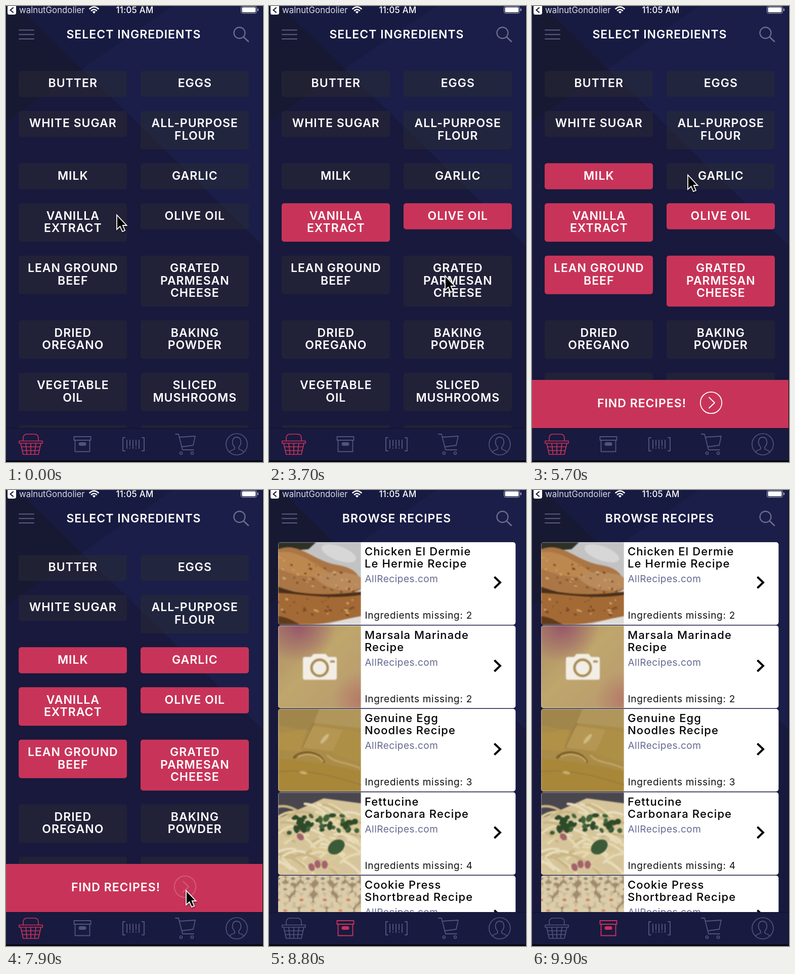
Recreate the animation shown at these times as an HTML page. Size 508 by 900 pixels, loop 10 s.

```html
<!DOCTYPE html>
<html lang="en">
<head>
<meta charset="utf-8">
<title>Recipe finder</title>
<style>
html, body { margin: 0; width: 100%; height: 100%; overflow: hidden; background: #18193c; }
svg { display: block; width: 100vw; height: 100vh; }
text { font-family: Inter, "Open Sans", sans-serif; }
.cap { font-size: 23px; font-weight: 600; letter-spacing: 1px; fill: #fff; text-anchor: middle; }
.name { font-size: 22px; font-weight: 500; letter-spacing: 1.1px; fill: #000; }
.site { font-size: 19px; letter-spacing: .5px; fill: #656990; }
.miss { font-size: 19px; letter-spacing: .7px; fill: #111; }
.line { fill: none; stroke-linejoin: round; stroke-linecap: round; }
</style>
</head>
<body>
<svg id="stage" viewBox="0 0 508 900" preserveAspectRatio="none"></svg>
<script>
const LOOP = 10000;
const RED = '#c83459', TILE = 'rgba(42,45,52,.5)';
const GREY_RGB = [80, 83, 124], RED_RGB = [200, 50, 88];
const stage = document.getElementById('stage');

const rect = (x, y, w, h, fill, extra = '') =>
  `<rect x="${x}" y="${y}" width="${w}" height="${h}" fill="${fill}" ${extra}/>`;
const line = (d, color, width = 2, extra = '') =>
  `<path class="line" d="${d}" stroke="${color}" stroke-width="${width}" ${extra}/>`;
const shape = (d, fill) => `<path d="${d}" fill="${fill}"/>`;
const ellipse = (x, y, rx, ry, fill, turn = 0) =>
  `<ellipse cx="${x}" cy="${y}" rx="${rx}" ry="${ry}" fill="${fill}" transform="rotate(${turn} ${x} ${y})"/>`;
const text = (cls, x, y, s, extra = '') => `<text class="${cls}" x="${x}" y="${y}" ${extra}>${s}</text>`;
const group = (id, body, extra = '') => `<g id="${id}" ${extra}>${body}</g>`;

function random(seed) {
  return () => (seed = (seed * 16807) % 2147483647) / 2147483647;
}

const backdrop = rect(0, 0, 508, 900, '#18193c') +
  shape('M0 0H23L150 124L0 228Z', '#171933') +
  shape('M23 0H330L150 124Z', '#181b41') +
  shape('M330 0H508V473L150 124Z', '#1a1e48') +
  rect(507, 0, 1, 900, '#0a0b1a');

const header = title => line('M26 47.5H55M26 56.3H55M26 65H55', '#5b5d80', 2) +
  `<circle class="line" cx="461.5" cy="53" r="11" stroke="#6b6d8c" stroke-width="2.3"/>` +
  line('M469.5 61L479 70', '#6b6d8c', 2.8) + text('cap', 252.5, 63.8, title);

// label lines, column, top, time of the tap
const TILES = [
  ['BUTTER', 0, 128], ['EGGS', 1, 128],
  ['WHITE SUGAR', 0, 207], ['ALL-PURPOSE|FLOUR', 1, 207],
  ['MILK', 0, 310.3, 5200], ['GARLIC', 1, 310.3, 5900],
  ['VANILLA|EXTRACT', 0, 389.3, 1000], ['OLIVE OIL', 1, 389.3, 2600],
  ['LEAN GROUND|BEEF', 0, 492.8, 4500], ['GRATED|PARMESAN|CHEESE', 1, 492.8, 3900],
  ['DRIED|OREGANO', 0, 620.3], ['BAKING|POWDER', 1, 620.3],
  ['VEGETABLE|OIL', 0, 723.8], ['SLICED|MUSHROOMS', 1, 723.8],
  ['', 0, 827], ['', 1, 827]
];

function tile([label, col, top], i) {
  const rows = label.split('|'), x = 25 + col * 241;
  return group('tile' + i,
    rect(x, top, 214, 27 + rows.length * 24.5, TILE, 'rx="5"') +
    rows.map((s, n) => text('cap', x + 107.3, top + 32.2 + n * 24.5, s)).join(''));
}

const banner = rect(0, 738, 507, 95, RED) + text('cap', 217, 791.8, 'FIND RECIPES!') +
  group('go', `<circle class="line" cx="354" cy="783" r="21.2" stroke="#fff" stroke-width="1.8"/>` +
    line('M350 772.5L361 783L350 793.5', '#fff', 1.8));

function chicken() {
  const r = random(7);
  let s = rect(0, 0, 164, 163, '#c4c3c4') + shape('M0 0H75L60 14L0 18Z', '#2f3026') +
    ellipse(120, 22, 36, 14, '#d8d7d7', 20) +
    shape('M0 14C40 -2 66 34 112 44C150 50 164 62 164 92C140 112 70 108 0 90Z', '#ab7645') +
    shape('M0 20C40 14 70 42 104 62C70 76 30 64 0 52Z', '#bd8850') +
    shape('M70 66C110 54 150 60 164 70V90C130 102 90 92 70 66Z', '#b98a5c') +
    shape('M0 98C50 96 110 108 164 104V146C120 154 90 164 40 163H0Z', '#a46a36') +
    shape('M0 88C50 108 110 104 164 98V104C100 114 50 102 0 100Z', '#4b3019') +
    shape('M0 146C20 148 34 158 44 163H0Z', '#5f3b1d') +
    shape('M100 163C124 152 150 150 164 146V163Z', '#dedcda');
  for (let i = 0; i < 70; i++) {
    const x = r() * 155, low = r() > .5;
    s += ellipse(x, low ? 108 + r() * 36 : 26 + x * .25 + r() * 45, 1 + r() * 3, 1 + r() * 1.5,
      r() > .4 ? '#7d4c25' : '#cfa36b', 25);
  }
  return s;
}

const blank = () => rect(0, 0, 164, 163, 'url(#tan)') + rect(0, 0, 164, 163, 'url(#rose)') +
  rect(0, 0, 164, 163, 'url(#rose2)') +
  shape('M52 62H65L70 56H94L99 62H112Q116 62 116 66V103Q116 107 112 107H53Q49 107 49 103V66Q49 62 53 62Z', '#f2eee6') +
  `<circle cx="82" cy="83.5" r="16" fill="#f2eee6" stroke="#a98d58" stroke-width="5"/>` +
  rect(103, 69, 9, 4, '#a98d58');

const noodles = () => rect(0, 0, 164, 163, '#a98c48') +
  shape('M0 0H86L68 45L0 32Z', '#a0864a') + shape('M82 0H164V38L70 28Z', '#b0965a') +
  shape('M70 33L130 42L108 84L48 76Z', '#b59753') + shape('M128 40L164 46V106L106 88Z', '#ae8f46') +
  shape('M0 48L56 40L44 84L0 80Z', '#b09147') +
  shape('M0 98C60 104 100 108 164 124V163H0Z', '#a88739') +
  line('M32 96C45 82 78 82 90 104', '#7c5e2a', 5) +
  line('M40 94C58 86 78 90 88 103M98 92C112 108 136 104 164 118', '#c0a15d', 4) +
  line('M0 124C50 118 110 132 164 150M70 28L48 76', '#95763a', 1.5) +
  ellipse(92, 59, 12, 4, '#cdb983', -50) + ellipse(50, 126, 8, 3, '#c6ad70', 10);

function pasta() {
  const r = random(21);
  let s = rect(0, 0, 164, 163, '#d6c59b') + shape('M0 0H164V22L90 12L0 52Z', '#4a464d');
  for (let i = 0; i < 65; i++) {
    const x = r() * 160, y = 34 + r() * 126, a = r() * 60 - 20;
    s += line(`M${x - 22} ${y - a * .5}Q${x} ${y - 12} ${x + 24} ${y + a * .5}`,
      ['#e6d8b0', '#dcc998', '#cab584', '#e8dcba'][i % 4], 5);
  }
  for (const [x, y] of [[38, 72], [44, 88], [78, 142], [66, 148], [92, 143]])
    s += ellipse(x, y, 8, 6, '#a3626a', x);
  for (let i = 0; i < 40; i++) {
    const x = 32 + r() * 124;
    s += ellipse(x, 44 + r() * 30 + Math.abs(x - 95) * .08, 4 + r() * 5, 3 + r() * 3,
      i % 3 ? '#2d4a29' : '#40633a', r() * 180);
  }
  return s + ellipse(115, 108, 18, 13, '#3a5a38', -35) + ellipse(22, 80, 5, 4, '#3d5a34');
}

function cookies() {
  let s = rect(0, 0, 164, 163, '#a08a70');
  for (let row = 0; row < 4; row++)
    for (let n = 0; n < 6; n++) {
      const size = 14 + row * 4, x = n * size * 2.1 + (row % 2) * 14, y = 6 + row * 21;
      s += ellipse(x, y, size, size * .62, '#cdbb97');
      for (let p = 0; p < 6; p++)
        s += ellipse(x + Math.cos(p * 1.047) * size * .55, y + Math.sin(p * 1.047) * size * .35,
          size * .45, size * .22, '#dccdaa', p * 60);
      s += ellipse(x, y, 4, 2.5, ['#85827f', '#a08f80', '#d07a58', '#cf8a62'][row]);
    }
  return s;
}

const RECIPES = [
  ['Chicken El Dermie|Le Hermie Recipe', 2, chicken, 8500],
  ['Marsala Marinade|Recipe', 2, blank, 8500],
  ['Genuine Egg|Noodles Recipe', 3, noodles, 8600],
  ['Fettucine|Carbonara Recipe', 4, pasta, 8600],
  ['Cookie Press|Shortbread Recipe', 4, cookies, 8700]
];

function card([title, missing, photo], i) {
  const rows = title.split('|');
  return `<g transform="translate(18 ${103 + i * 164.5})">` +
    rect(0, 0, 469.4, 163, '#fff', 'rx="5"') +
    group('photo' + i, `<g filter="url(#soft)">${photo()}</g>`, 'clip-path="url(#thumb)"') +
    rows.map((s, n) => text('name', 171, 26 + n * 24, s)).join('') +
    text('site', 171.5, 79, 'AllRecipes.com') +
    text('miss', 171.5, 151, 'Ingredients missing: ' + missing) +
    `<path d="M427.5 68.5L439 79.5L427.5 90.5" fill="none" stroke="#000" stroke-width="4"/></g>`;
}

const status = shape('M6 -2H16Q20 -2 20 2V13Q20 17 16 17H6Q3 17 3 13V2Q3 -2 6 -2Z', '#fff') +
  line('M14 3.5L8.5 8L14 12.5', '#14152c', 2.2) +
  text('', 26, 14, 'walnutGondolier', 'font-size="16.8" fill="#d9dae4"') +
  line('M165.5 5.5Q174 -2 182.5 5.5M169 9Q174 4.5 179 9', '#fff', 2.6) +
  shape('M170.8 11.5Q174 9 177.2 11.5L174 15Z', '#fff') +
  text('', 254.5, 14, '11:05 AM', 'font-size="16.8" font-weight="500" letter-spacing=".3" text-anchor="middle" fill="#fff"') +
  rect(464.5, .5, 31, 14, 'none', 'rx="3.5" stroke="#a5a6b5"') +
  rect(466.5, 2.5, 27, 10, '#fff', 'rx="2"') + rect(497, 5, 2, 5, '#a5a6b5', 'rx="1"');

const GREY = `rgb(${GREY_RGB})`;
const current = 'currentColor';
const tabs = rect(0, 833, 508, 64, '#191a40') + rect(0, 833, 508, 1, '#111229') +
  rect(0, 897, 508, 3, '#05060d') + rect(507, 833, 1, 67, '#0a0b1a') +
  group('basket', line('M34 858V853Q34 845 42 845H56Q64 845 64 853V858M26 858.5H72V863H26Z' +
    'M29 863L34 885H64L69 863M31 870H67M32.5 877.5H65.5M39 863L41.5 885M49 863V885M59 863L56.5 885', current, 1.7)) +
  group('box', line('M134.5 850H167.5V857H134.5ZM136.5 857V879.5H165.5V857', current, 1.9) +
    rect(143.5, 861, 15, 7, current, 'rx="3.5"')) +
  line('M235 852H231V878H235M269 852H273V878H269', GREY, 1.9) +
  line('M239 857V873M245 857V868M251 857V873M257 857V868M263 857V873M245 872V873M257 872V873', GREY, 1.9) +
  line('M335 845H341L349 876H371M343 851L374 849L370 867L347 870', GREY, 1.8) +
  `<g class="line" stroke="${GREY}" stroke-width="1.7"><circle cx="346" cy="882.5" r="2.5"/><circle cx="368" cy="882.5" r="2.5"/><circle cx="456" cy="865" r="21"/></g>` +
  line('M442 880.5Q444 877 451 875Q453 873 451.5 870C445 863 447 851 456 851C465 851 467 863 460.5 870Q459 873 461 875Q468 877 470 880.5', GREY, 1.8);

const glow = (id, x, y, r, color) =>
  `<radialGradient id="${id}" cx="${x}" cy="${y}" r="${r}"><stop offset="0" stop-color="${color}"/><stop offset="1" stop-color="${color}" stop-opacity="0"/></radialGradient>`;

stage.innerHTML = `<defs>
  <clipPath id="thumb"><path d="M164 0H5Q0 0 0 5V158Q0 163 5 163H164Z"/></clipPath>
  <filter id="soft" color-interpolation-filters="sRGB"><feGaussianBlur stdDeviation=".8"/></filter>
  <linearGradient id="tan" x2="1" y2="1"><stop offset="0" stop-color="#ab8c66"/><stop offset=".45" stop-color="#bfa66c"/><stop offset="1" stop-color="#b99a70"/></linearGradient>
  ${glow('rose', .25, 0, .45, '#98566a')}${glow('rose2', 1, .9, .35, '#b57a68')}</defs>` +
  group('pick', backdrop + header('SELECT INGREDIENTS') + TILES.map(tile).join('') + group('banner', banner)) +
  group('browse', backdrop + header('BROWSE RECIPES') + RECIPES.map(card).join('')) +
  tabs + status +
  group('cursor', '<path d="M1 2.5V31L7.5 25L12 35L17 33L12.8 23H20.5Z" fill="#000" stroke="#fff" stroke-width="1.8"/>',
    'style="filter:drop-shadow(0 2px 1.5px rgba(0,0,0,.4))"');

const el = id => document.getElementById(id);
const span = (t, from, to) => Math.min(1, Math.max(0, (t - from) / (to - from)));
const ease = p => p * p * (3 - 2 * p);
const move = (id, x, y) => el(id).setAttribute('transform', `translate(${x} ${y})`);
const show = (id, on) => el(id).setAttribute('visibility', on ? 'visible' : 'hidden');
const tint = (id, p) => el(id).setAttribute('color',
  `rgb(${GREY_RGB.map((g, i) => Math.round(g + (RED_RGB[i] - g) * p))})`);

// time, x, y of the pointer
const PATH = [
  [0, 218, 410], [1600, 218, 410], [2300, 345, 412], [3000, 345, 412], [3600, 347, 530],
  [4000, 347, 530], [4400, 195, 530], [4600, 195, 530], [5100, 180, 332], [5300, 180, 332],
  [5650, 307, 331], [6500, 307, 331], [7500, 355, 788], [LOOP, 355, 788]
];

function pointer(t) {
  const i = PATH.findIndex(k => k[0] > t), a = PATH[i - 1], b = PATH[i];
  const p = ease(span(t, a[0], b[0]));
  return [a[1] + (b[1] - a[1]) * p, a[2] + (b[2] - a[2]) * p];
}

function render(t) {
  TILES.forEach(([, , , tap], i) => {
    if (!tap) return;
    const node = el('tile' + i);
    node.firstChild.setAttribute('fill', t >= tap ? RED : TILE);
    node.setAttribute('opacity', t >= tap ? .4 + .6 * span(t, tap, tap + 250) : 1);
  });
  show('banner', t >= 4600);
  move('banner', 0, 95 * (1 - ease(span(t, 4600, 4900))));
  el('go').setAttribute('opacity', 1 - .8 * (span(t, 7750, 7850) - span(t, 7980, 8200)));

  const x = 508 * (1 - span(t, 7950, 8450)) ** 4;
  move('pick', x - 508, 0);
  move('browse', x, 0);
  show('browse', t > 7950);
  RECIPES.forEach((r, i) => show('photo' + i, t >= r[3]));
  tint('basket', 1 - span(t, 8000, 8330));
  tint('box', span(t, 8150, 8450));

  move('cursor', ...pointer(t));
  show('cursor', t < 8200);
}

let start;
function tick(now) {
  start ??= now;
  render((now - start) % LOOP);
  requestAnimationFrame(tick);
}
render(0);
requestAnimationFrame(tick);
</script>
</body>
</html>
```
